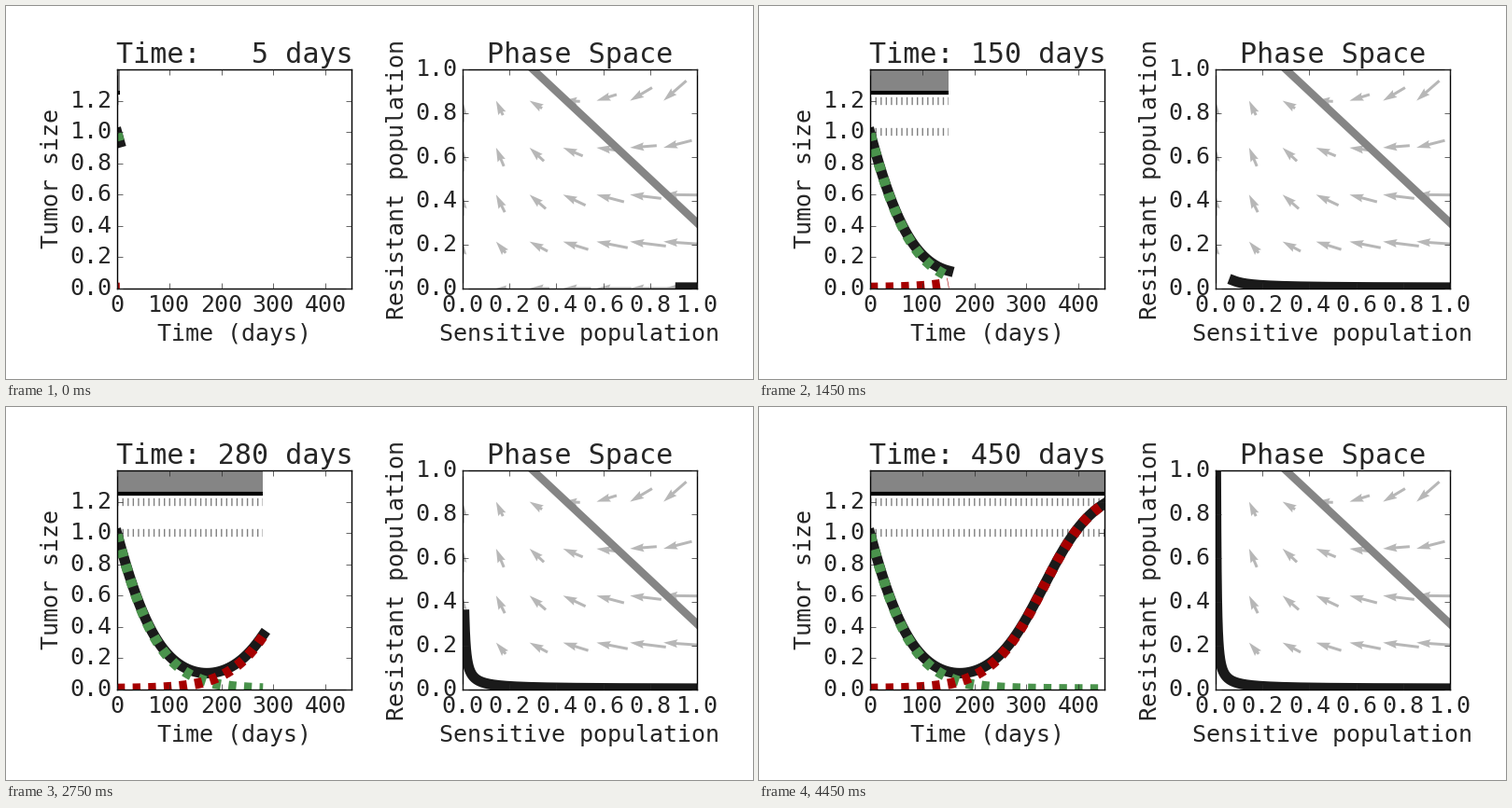
A matplotlib script for the animation above (4500 ms loop, 800 by 400 pixels).

```python
import numpy as np
import matplotlib.pyplot as plt
from matplotlib.animation import FuncAnimation
from matplotlib.patches import Rectangle

WIDTH, HEIGHT, DPI = 800, 400, 100
FRAMES, INTERVAL, DAYS_PER_FRAME = 90, 50, 5
RATE, CAPACITY = 0.02, 1.3
TOP, BOTTOM = 68, 303
INK, BLACK, GRAY = "#262626", "#1a1a1a", "#858585"
GREEN, RED, ARROW = "#4a934c", "#a60000", "#b7b7b7"

plt.style.use("classic")
plt.rcParams.update({
    "font.family": "DejaVu Sans Mono",
    "font.size": 18,
    "text.color": INK,
    "axes.labelcolor": INK,
    "xtick.color": INK,
    "ytick.color": INK,
    "figure.facecolor": "white",
})


def growth(sensitive, resistant):
    """Daily change of both populations under constant treatment."""
    total = sensitive + resistant
    return (-RATE * sensitive * (1 - total / (2 * CAPACITY)),
            RATE * resistant * (1 - total / CAPACITY))


def simulate(sensitive, resistant, days, substeps=20):
    history = [(sensitive, resistant)]
    for _ in range(days):
        for _ in range(substeps):
            ds, dr = growth(sensitive, resistant)
            sensitive += ds / substeps
            resistant += dr / substeps
        history.append((sensitive, resistant))
    return np.array(history).T


def add_panel(left, right, xlim, ylim, xlabel, ylabel):
    ax = fig.add_axes([left / WIDTH, 1 - BOTTOM / HEIGHT,
                       (right - left) / WIDTH, (BOTTOM - TOP) / HEIGHT])
    ax.set(xlim=xlim, ylim=ylim, xlabel=xlabel, ylabel=ylabel)
    return ax


days = np.arange(FRAMES * DAYS_PER_FRAME + 1)
sensitive, resistant = simulate(0.99, 0.0045, days[-1])

fig = plt.figure(figsize=(WIDTH / DPI, HEIGHT / DPI), dpi=DPI)

# Tumor size over time
size_ax = add_panel(119, 370, (0, 450), (0, 1.4), "Time (days)", "Tumor size")
size_ax.set_xticks(range(0, 401, 100))
size_ax.set_yticks(np.arange(7) * 0.2, [f"{0.2 * i:.1f}" for i in range(7)])
title = size_ax.set_title("")
dose = size_ax.add_patch(Rectangle((0, 1.25), 0, 0.15, facecolor=GRAY, linewidth=0))
levels = [
    size_ax.plot([], [], color="black", lw=3, solid_capstyle="butt")[0],
    size_ax.plot([], [], color="gray", lw=6, ls=":")[0],
    size_ax.plot([], [], color="gray", lw=6, ls=":")[0],
]
curves = [
    (size_ax.plot([], [], color=color, lw=8, ls=style)[0], values)
    for color, style, values in (
        (BLACK, "-", sensitive + resistant),
        (GREEN, "--", sensitive),
        (RED, "--", resistant),
    )
]

# Phase space with its flow field and nullcline
phase_ax = add_panel(489, 740, (0, 1), (0, 1),
                     "Sensitive population", "Resistant population")
ticks = np.arange(6) * 0.2
tick_labels = [f"{t:.1f}" for t in ticks]
phase_ax.set_xticks(ticks, tick_labels)
phase_ax.set_yticks(ticks, tick_labels)
phase_ax.set_title("Phase Space")
grid_s, grid_r = np.meshgrid(np.arange(7) / 7, np.arange(5) * 1.5 / 7)
phase_ax.quiver(grid_s, grid_r, *growth(grid_s, grid_r), color=ARROW, pivot="tip",
                angles="xy", scale_units="xy", scale=0.06, units="dots", width=3)
phase_ax.plot([0, CAPACITY], [CAPACITY, 0], color=GRAY, lw=6)
path, = phase_ax.plot([], [], color=BLACK, lw=8)
phase_ax.set(xlim=(0, 1), ylim=(0, 1))


def update(frame):
    day = DAYS_PER_FRAME * (frame + 1)
    shown = slice(day + 1)
    title.set_text(f"Time: {day:3d} days")
    dose.set_width(day)
    for line, level in zip(levels, (1.25, 1.2, 1.0)):
        line.set_data([0, day], [level, level])
    for line, values in curves:
        line.set_data(days[shown], values[shown])
    path.set_data(sensitive[shown], resistant[shown])


animation = FuncAnimation(fig, update, frames=FRAMES, interval=INTERVAL,
                          repeat=True, repeat_delay=0)
plt.show()
```
